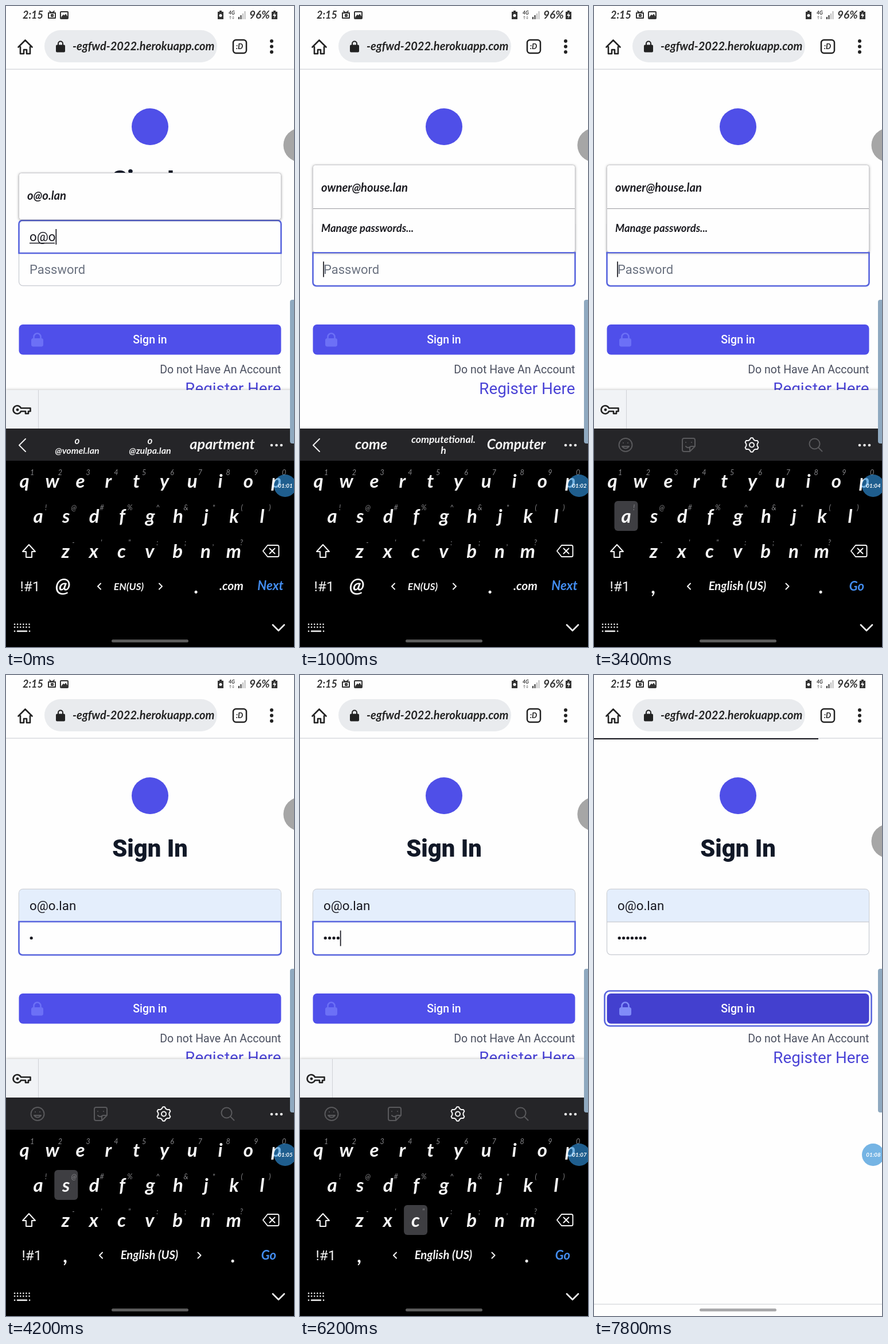
These frames come from a looping animation (502x1115 px, 8000 ms). An HTML page:

```html
<!DOCTYPE html>
<html lang="en">
<head>
<meta charset="utf-8">
<title>Sign in on a phone</title>
<style>
  html, body { margin: 0; width: 100%; height: 100%; overflow: hidden; background: #fefefe; }
  svg { display: block; width: 100vw; height: 100vh; }
  text { font-family: Roboto, sans-serif; white-space: pre; }
  .hand, .hand text { font-family: Lato, sans-serif; font-style: italic; font-weight: 700; }
  .hand .plain { font-family: Roboto, sans-serif; font-style: normal; font-weight: 400; }
  .mid { text-anchor: middle; }
  .end { text-anchor: end; }
  .line { fill: none; stroke-width: 2; stroke-linecap: round; stroke-linejoin: round; }
  .ring { fill: none; stroke: #5865de; stroke-width: 2.6; }
  .pop { fill: #fefefe; stroke: #c9c9cd; filter: drop-shadow(0 1px 2px #0005); }
</style>
</head>
<body>
<svg id="stage" viewBox="0 0 502 1115">
  <rect width="502" height="1115" fill="#fefefe"/>

  <!-- status bar -->
  <g class="hand" fill="#333">
    <text x="29" y="22" font-size="18">2:15</text>
    <text x="424" y="22" font-size="19">96%</text>
    <g class="line" stroke="#333" stroke-width="1.5">
      <rect x="74" y="12" width="12" height="9"/>
      <path d="M76 9l4 3 4-3M79 15h3v3h-3z"/>
      <rect x="95" y="10" width="13" height="12" rx="1"/>
      <path d="M97 20l3-4 2 2 2-3 3 5z" fill="#333"/>
    </g>
    <path d="M372 8h4v2h3v13h-10v-13h3zM466 8h4v2h3v13h-10v-13h3z"/>
    <circle cx="374" cy="16.500" r="2.500" fill="#fefefe"/>
    <path d="M469 11l-4 6h3l-1 5 4-7h-3z" fill="#fefefe"/>
    <text x="388" y="15" font-size="8.500">4G</text>
    <path d="M391 23v-5M389.500 19.500l1.500-2 1.500 2M396 17v5M394.500 20.500l1.500 2 1.500-2" fill="none" stroke="#888"/>
    <path d="M405 19h2v4h-2zM408.500 16h2v7h-2z"/>
    <path d="M412 13h2v10h-2zM415.500 9h2v14h-2z" fill="#bbb"/>
  </g>

  <!-- browser bar -->
  <path class="line" d="M25 71v12h6v-7h5v7h6V71M21.500 71.500L33.500 59.500 45.500 71.500" stroke="#222" style="stroke-width:2.600"/>
  <rect x="67" y="42" width="301" height="56" rx="28" fill="#e9ebee"/>
  <rect x="87" y="67.500" width="16" height="13" rx="2" fill="#222"/>
  <path d="M91 68v-2.500a4 4 0 0 1 8 0V68" fill="none" stroke="#222" stroke-width="2"/>
  <text class="hand" x="116" y="77" font-size="20" fill="#222">-egfwd-2022.herokuapp.com</text>
  <rect x="396" y="59" width="23" height="23" rx="5" fill="none" stroke="#222" stroke-width="2.500"/>
  <text class="hand mid" x="407" y="75" font-size="13" fill="#222">:D</text>
  <g fill="#222"><circle cx="463" cy="61" r="3"/><circle cx="463" cy="70.500" r="3"/><circle cx="463" cy="80" r="3"/></g>
  <path d="M0 110H502M0 1094.500H502" stroke="#d9dade" stroke-width="1.500"/>
  <rect id="bar" y="110" height="2" fill="#15151c"/>

  <!-- page -->
  <circle cx="251" cy="210" r="32" fill="#4f4fe8"/>
  <text class="mid" x="251" y="316" font-size="41.700" font-weight="800" fill="#111827">Sign In</text>
  <rect x="22.500" y="372.500" width="457" height="114" rx="7" fill="#fefefe" stroke="#cdd0d6" stroke-width="1.400"/>
  <path data-on="auto=1" d="M23 429V379a6 6 0 0 1 6-6H473a6 6 0 0 1 6 6V429z" fill="#e4eefc"/>
  <path d="M23 429.500H479" stroke="#cdd0d6" stroke-width="1.400"/>
  <text id="mail" x="41" y="408.500" font-size="22.300" fill="#17171f"></text>
  <path data-on="auto=0" d="M41 412.500H85" stroke="#17171f" stroke-width="1.400"/>
  <text data-on="dots=0" x="41" y="466" font-size="22" fill="#6b7280">Password</text>
  <g id="dots" fill="#17171f"></g>
  <path class="ring" data-on="focus=mail" d="M22.500 430V379a6 6 0 0 1 6-6H473.500a6 6 0 0 1 6 6V430z"/>
  <path class="ring" data-on="focus=pass" d="M22.500 429H479.500V481a6 6 0 0 1-6 6H28.500a6 6 0 0 1-6-6z"/>
  <rect id="caret" width="1.700" height="27" fill="#17171f"/>

  <rect class="ring" data-on="focus=button" x="18.500" y="549.500" width="465" height="61" rx="9"/>
  <rect id="button" x="22.500" y="554" width="457" height="52.500" rx="7"/>
  <g id="lock">
    <rect x="44.500" y="578.500" width="20" height="13.500" rx="2.500"/>
    <path d="M48.500 579v-3.500a6 6 0 0 1 12 0V579" fill="none" stroke-width="2.600"/>
  </g>
  <text class="mid" x="251" y="587" font-size="19.500" font-weight="500" fill="#fff">Sign in</text>
  <rect data-on="tap=1" x="22.500" y="554" width="457" height="52.500" rx="7" fill="#33b5e5" opacity=".4"/>
  <text class="end" x="479.500" y="638.500" font-size="19.500" fill="#4b5060">Do not Have An Account</text>
  <text class="end" x="479.500" y="674.500" font-size="27.800" fill="#4a43d6">Register Here</text>

  <!-- autofill lists -->
  <g class="hand" fill="#1c1c22">
    <g data-on="pop=one">
      <rect class="pop" x="22.500" y="290.500" width="457" height="81" rx="4"/>
      <text x="37" y="337" font-size="20.300">o@o.lan</text>
    </g>
    <g data-on="pop=two">
      <rect class="pop" x="22.500" y="276.500" width="457" height="152" rx="4"/>
      <path d="M23 352.500H479" stroke="#9b9ba0"/>
      <path d="M22 429H480" stroke="#5865de" stroke-width="2"/>
      <text x="37" y="323" font-size="20.300">owner@house.lan</text>
      <text x="37" y="393" font-size="18.400">Manage passwords...</text>
    </g>
  </g>

  <g data-on="keybar=1">
    <rect y="668" width="502" height="67" fill="#f1f3f6" style="filter:drop-shadow(0 -1px 2px #0003)"/>
    <path d="M56.500 668V735" stroke="#cfd2d6"/>
    <path d="M26 699.500H42.500V705H39V709H34V705H26A7 7 0 1 1 26 699.500z" fill="none" stroke="#222" stroke-width="2.600" stroke-linejoin="round"/>
    <circle cx="20" cy="702.300" r="2.400" fill="#222"/>
  </g>

  <!-- keyboard -->
  <g data-on="board=1">
    <rect y="735" width="502" height="380" fill="#000"/>
    <rect y="735" width="502" height="56" fill="#252528"/>
    <g fill="#eee"><circle cx="463" cy="764" r="2.300"/><circle cx="471.500" cy="764" r="2.300"/><circle cx="480" cy="764" r="2.300"/></g>
    <path class="line" data-on="keys=mail" d="M34 753L23 764 34 775" stroke="#eee"/>
    <g class="hand mid" fill="#f4f4f4">
      <g data-on="words=mail">
        <text x="124" y="762" font-size="17">o</text>
        <text x="124" y="779" font-size="16">@vomel.lan</text>
        <text x="251" y="762" font-size="17">o</text>
        <text x="251" y="779" font-size="16">@zulpa.lan</text>
        <text x="377" y="771" font-size="25.300">apartment</text>
      </g>
      <g data-on="words=com">
        <text x="124" y="771" font-size="25">come</text>
        <text x="250" y="760" font-size="17.700">computetional.</text>
        <text x="250" y="779" font-size="17.700">h</text>
        <text x="377" y="771" font-size="24.400">Computer</text>
      </g>
    </g>
    <g class="line" data-on="words=tools" stroke="#59595c">
      <circle cx="55" cy="763.500" r="11.500"/>
      <path d="M49 766q6 7 12 0zM51 760v.1M59 760v.1"/>
      <path d="M157 752h16a3 3 0 0 1 3 3v11l-9 9h-10a3 3 0 0 1-3-3v-17a3 3 0 0 1 3-3zM176 766h-6a3 3 0 0 0-3 3v6M160 766q4 4 7 1M160 759v.1M170 759v.1"/>
      <circle cx="384.500" cy="761.500" r="9"/><path d="M391 768l6.500 6.500"/>
      <path id="gear" stroke="#f4f4f4"/><circle cx="275" cy="763.500" r="4" stroke="#f4f4f4"/>
    </g>

    <rect id="press" width="41" height="52" rx="6" fill="#3e3e42"/>
    <g id="keys" class="hand mid"></g>

    <g class="line" stroke="#f4f4f4">
      <path d="M40 937l11 12h-6v10h-10v-10h-6z"/>
      <path d="M456 938h17a2.500 2.500 0 0 1 2.500 2.500v15a2.500 2.500 0 0 1-2.500 2.500h-17l-8-10zM459.500 943.500l9 9M468.500 943.500l-9 9"/>
      <path d="M465 1076.500L475 1086.500 485 1076.500" style="stroke-width:2.600"/>
      <path d="M15 1075.500H42M15 1080.500H42" stroke-dasharray=".1 5" style="stroke-width:2.600"/>
      <path d="M15 1087.500h.1M20 1087.500h16M41 1087.500h.1" style="stroke-width:2.600"/>
    </g>
    <g class="hand mid" fill="#f4f4f4" data-on="keys=mail">
      <text class="plain" x="42" y="1018" font-size="24.500">!#1</text>
      <text x="99" y="1020" font-size="35">@</text>
      <text x="214" y="1016" font-size="17.500">EN(US)</text>
      <text x="332" y="1022" font-size="34">.</text>
      <text x="393" y="1016" font-size="21">.com</text>
      <text x="461" y="1016" font-size="22.300" fill="#438df0">Next</text>
      <path class="line" d="M165 1004.500l-5 5 5 5M267 1004.500l5 5-5 5" stroke="#f4f4f4"/>
    </g>
    <g class="hand mid" fill="#f4f4f4" data-on="keys=go">
      <text class="plain" x="45" y="1018" font-size="24.500">!#1</text>
      <text x="104" y="1022" font-size="34">,</text>
      <text x="250" y="1016" font-size="20.300">English (US)</text>
      <text x="396" y="1022" font-size="34">.</text>
      <text x="458" y="1017" font-size="22" fill="#438df0">Go</text>
      <path class="line" d="M168 1004.500l-5 5 5 5M334.500 1004.500l5 5-5 5" stroke="#f4f4f4"/>
    </g>
  </g>

  <rect id="home" x="184" y="1102" width="134" height="5" rx="2.500"/>

  <!-- floating overlays -->
  <circle id="handle" cx="513" r="29.500" fill="#a6a6a6"/>
  <path d="M502 511h-3a4 4 0 0 0-4 4v242a4 4 0 0 0 4 4h3z" fill="#8fa9c0"/>
  <circle cx="486.500" cy="834.500" r="19.500" fill="#2f8fd8" opacity=".66"/>
  <text id="clock" class="hand mid" x="487" y="838" font-size="9.800" fill="#fff"></text>
</svg>

<script>
const LOOP = 8000, STEP = 200;
const $ = id => document.getElementById(id);
const set = (el, attrs) => { for (const k in attrs) el.setAttribute(k, attrs[k]); return el; };
const add = (parent, tag, attrs, text = '') => {
  const el = set(document.createElementNS('http://www.w3.org/2000/svg', tag), attrs);
  el.textContent = text;
  return parent.appendChild(el);
};

// letters, hints, first centre, baseline
const rows = [
  ['qwertyuiop', '1234567890', 32, 838],
  ['asdfghjkl', '!@#%^&*()', 56, 899],
  ['zxcvbnm', '-\'":;,?', 104, 960]
];
const keyAt = {};
for (const [letters, hints, x0, y] of rows) {
  [...letters].forEach((c, i) => {
    const x = x0 + 48.8 * i;
    keyAt[c] = { x: x - 20.5, y: y - 38 };
    add($('keys'), 'text', { x: x + 13.5, y: y - 22, 'font-size': 12.5, fill: '#858588', style: 'font-weight:400' }, hints[i]);
    add($('keys'), 'text', { x, y, 'font-size': 33, fill: '#f8f8f8' }, c);
  });
}

const dots = Array.from({ length: 7 }, (_, i) =>
  add($('dots'), 'circle', { cx: 44.2 + 7.4 * i, cy: 457.5, r: 2.6 }));

const teeth = Array.from({ length: 24 }, (_, i) => {
  const a = (i - 0.5) * Math.PI / 12, r = i % 4 < 2 ? 12.3 : 9.6;
  return (275 + r * Math.sin(a)).toFixed(1) + ' ' + (763.5 - r * Math.cos(a)).toFixed(1);
});
set($('gear'), { d: 'M' + teeth.join('L') + 'z' });

// each entry changes only what it names
const script = [
  [0, { pop: 'one', focus: 'mail', mail: 'o@o', auto: 0, words: 'mail', keybar: 1, keys: 'mail', board: 1,
        key: '', dots: 0, caret: 1, tap: 0, bar: 0, handle: 242, button: '#4f4fea', lock: '#6c70f6' }],
  [200, { pop: '', mail: 'o@o.lan', auto: 1 }],
  [400, { words: 'com', keybar: 0 }],
  [800, { focus: 'pass' }],
  [1000, { pop: 'two' }],
  [1200, { keys: 'go', words: 'tools' }],
  [1400, { keybar: 1, caret: 0 }],
  [1800, { caret: 1 }],
  [2400, { caret: 0 }],
  [2800, { caret: 1 }],
  [3400, { key: 'a' }],
  [3600, { key: '', dots: 1, pop: '' }],
  [4000, { caret: 0 }],
  [4200, { key: 's' }],
  [4600, { key: '', dots: 2, caret: 1 }],
  [4800, { key: 'd' }],
  [5000, { key: '', dots: 3 }],
  [5200, { key: 'f' }],
  [5800, { key: '', dots: 4 }],
  [6200, { key: 'c' }],
  [6400, { key: '', dots: 5 }],
  [6600, { key: 'x' }],
  [6800, { key: 'z', dots: 6 }],
  [7000, { key: '', dots: 7 }],
  [7400, { focus: 'button', caret: 0, tap: 1, button: '#3333ce', lock: '#818cf8' }],
  [7600, { tap: 0, board: 0, keybar: 0, bar: 260, button: '#4340cf' }],
  [7800, { bar: 391, handle: 289 }]
];
const parts = [...document.querySelectorAll('[data-on]')].map(el => [el, ...el.dataset.on.split('=')]);
const show = (el, on) => { el.style.display = on ? '' : 'none'; };

function draw(t) {
  const s = Object.assign({}, ...script.filter(([at]) => at <= t).map(([, change]) => change));
  for (const [el, name, value] of parts) show(el, String(s[name]) === value);
  dots.forEach((dot, i) => show(dot, i < s.dots));

  $('mail').textContent = s.mail;
  const inMail = s.focus === 'mail';
  set($('caret'), {
    x: inMail ? 41 + $('mail').getComputedTextLength() : 40.2 + 7.4 * s.dots,
    y: inMail ? 388 : 444.5
  });
  show($('caret'), s.caret);

  show($('press'), s.key);
  if (s.key) set($('press'), keyAt[s.key]);
  set($('bar'), { width: s.bar });
  set($('button'), { fill: s.button });
  set($('lock'), { fill: s.lock, stroke: s.lock });
  set($('handle'), { cy: s.handle });
  set($('home'), { fill: s.board ? '#5b5b5b' : '#a9a9ab' });
  $('clock').textContent = '01:0' + Math.min(8, 1 + Math.floor(t / 1000));
}

let last = -1;
const start = performance.now();
function tick() {
  const t = Math.floor((performance.now() - start) % LOOP / STEP) * STEP;
  if (t !== last) draw(last = t);
  requestAnimationFrame(tick);
}
tick();
</script>
</body>
</html>
```
